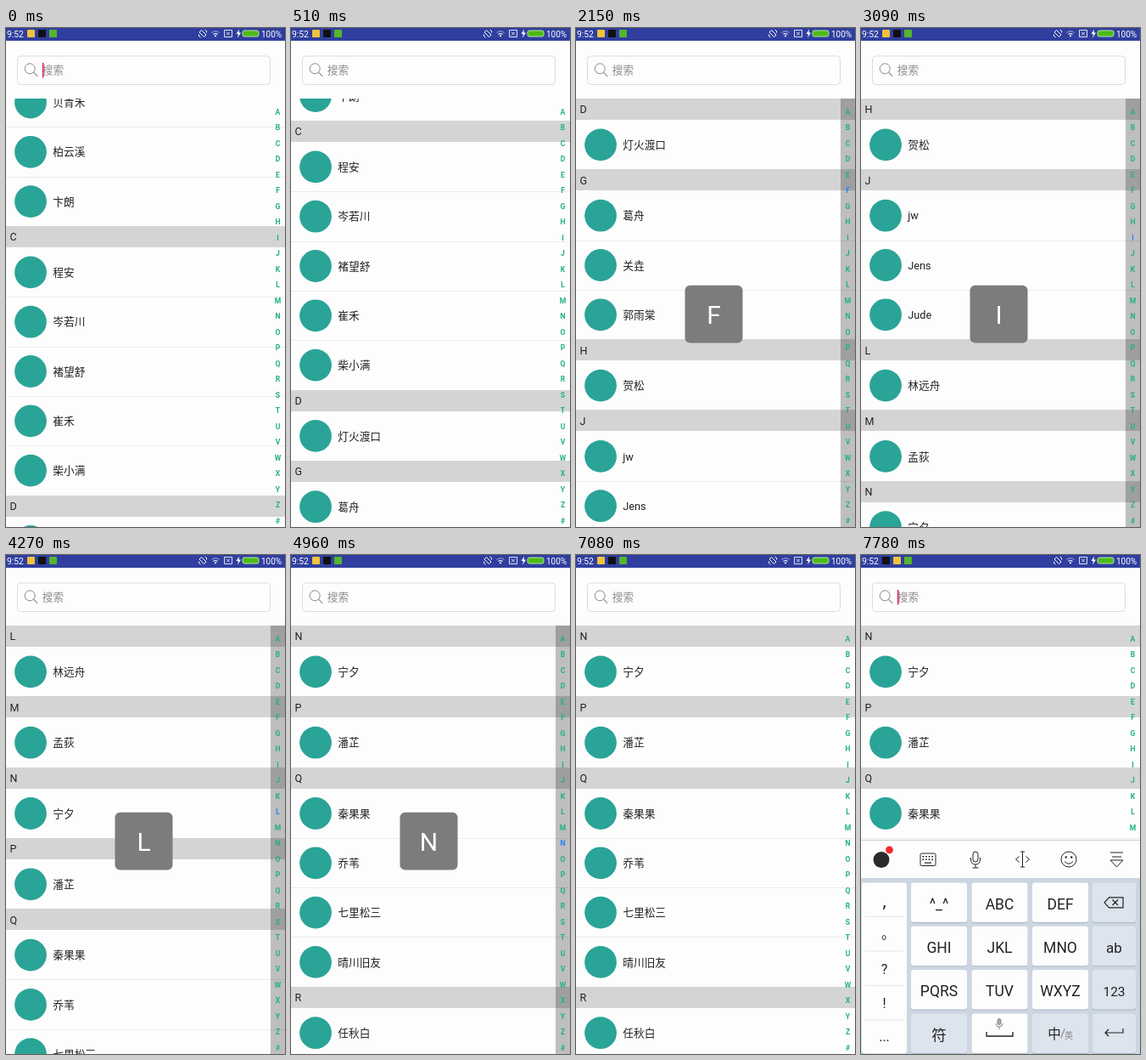
Write an HTML page with a canvas that moves like this. It is 329x587 px and loops after 8000 ms.

```html
<!DOCTYPE html>
<html lang="zh">
<head>
<meta charset="utf-8">
<style>
html, body { margin: 0; width: 100%; height: 100%; overflow: hidden; background: #fdfdfd; }
canvas { display: block; width: 329px; height: 587px; }
</style>
</head>
<body>
<canvas id="stage"></canvas>
<script>
const W = 329, H = 587, LOOP = 8000;
const TOP = 83, HEAD = 25, ROW = 58.3;
const INK = '#222', WHITE = '#fdfdfd';
const sections = {
  B: ['贝青禾', '柏云溪', '卞朗'],
  C: ['程安', '岑若川', '褚望舒', '崔禾', '柴小满'],
  D: ['灯火渡口'],
  G: ['葛舟', '关垚', '郭雨棠'],
  H: ['贺松'],
  J: ['jw', 'Jens', 'Jude'],
  L: ['林远舟'],
  M: ['孟荻'],
  N: ['宁夕'],
  P: ['潘芷'],
  Q: ['秦果果', '乔苇', '七里松三', '晴川旧友'],
  R: ['任秋白']
};
const letters = [...'ABCDEFGHIJKLMNOPQRSTUVWXYZ#'];

// Vertical place of every section inside the list
const place = {};
let total = 0;
for (const key in sections) {
  place[key] = total;
  total += HEAD + sections[key].length * ROW;
}

// Timeline (ms)
const dragStart = place.C - 233, dragMid = place.C - 109;
const scrollKeys = [[0, dragStart], [510, dragMid], [1110, dragMid + 105], [1230, dragMid + 115], [1620, dragMid + 240]];
const ticks = [0, 120, 250, 380, 510, 660, 810, 960, 1110, 1230, 1360, 1490, 1620,
  7080, 7230, 7350, 7480, 7620, 7780];
const touches = [[1900, 'D'], [2030, 'E'], [2150, 'F'], [2300, 'G'], [2450, 'H'], [2690, 'I'],
  [3490, 'J'], [3700, 'K'], [4000, 'L'], [4420, 'M'], [4820, 'N']];
const RELEASE = 6360;
const caretToggles = [120, 660, 1110, 1620, 2030, 2600, 3090, 3490, 4130, 4540, 4960, 5490, 6080, 6520, 7080, 7620];

const canvas = document.getElementById('stage');
const dpr = window.devicePixelRatio || 1;
canvas.width = W * dpr;
canvas.height = H * dpr;
const c = canvas.getContext('2d');

const snap = t => ticks.filter(v => v <= t).pop();

function rect(x, y, w, h, color, r = 0, border) {
  c.beginPath();
  c.roundRect(x, y, w, h, r);
  if (color) { c.fillStyle = color; c.fill(); }
  if (border) { c.strokeStyle = border; c.lineWidth = 1; c.stroke(); }
}
function disc(x, y, r, color) {
  c.beginPath();
  c.arc(x, y, r, 0, 7);
  c.fillStyle = color;
  c.fill();
}
function line(d, color, width = 1) {
  c.strokeStyle = color;
  c.lineWidth = width;
  c.stroke(new Path2D(d));
}
function shape(d, color) {
  c.fillStyle = color;
  c.fill(new Path2D(d));
}
// y is the middle of the capitals
function text(s, x, y, size, color = INK, align = 'left', weight = 400) {
  c.font = `${weight} ${size}px Roboto, "Noto Sans CJK SC", sans-serif`;
  c.textAlign = align;
  c.fillStyle = color;
  c.fillText(s, x, y + size * 0.365);
}

function scrollAt(t) {
  const now = snap(t);
  for (let i = 1; i < scrollKeys.length; i++) {
    const [t0, a] = scrollKeys[i - 1], [t1, b] = scrollKeys[i];
    if (now <= t1) return a + (b - a) * (now - t0) / (t1 - t0);
  }
  return scrollKeys[scrollKeys.length - 1][1];
}

function drawStatus(t) {
  rect(0, 0, W, 15, '#303f9f');
  text('9:52', 1, 7, 10.3, '#fff');
  const swapped = t >= 7620;
  rect(25, 2, 9, 9, swapped ? '#111' : '#f0c33c', 1);
  rect(38, 2, 9, 9, swapped ? '#f0c33c' : '#111', 1);
  rect(51, 2, 9, 9, '#55b52c', 1);
  // vibration, wifi, no SIM, charging
  line('M230.500 2.500 L236 8 L233.500 10.500 L228 5 Z M227.500 7.500 v2 l2 1.500 M234.500 2 l2 1.500 v2', '#fff');
  line('M242.500 5.500 Q247 2 251.500 5.500', '#aab1dc');
  line('M244.500 7.500 Q247 5.500 249.500 7.500', '#fff', 1.2);
  disc(247, 9.3, 1.1, '#fff');
  line('M257.500 2.500 h9 v8 h-9 z M260 4.500 l4 4 M264 4.500 l-4 4', '#dfe2f2');
  shape('M275 1.500 L271.500 7 H274 L273 11.500 L277 5.500 H274.500 Z', '#fff');
  rect(279, 3, 19, 7, '#4cbb17', 2, '#b9dfb0');
  text('100%', 301, 7, 10, '#fff');
}

function drawSearch(caret) {
  rect(13.5, 33, 298, 33.5, null, 4, '#dcdcdc');
  c.beginPath();
  c.arc(28.2, 47.8, 6, 0, 7);
  c.strokeStyle = '#8a8a8a';
  c.stroke();
  line('M32.500 52.100 L37.200 56.800', '#8a8a8a', 1.1);
  text('搜索', 42.8, 49, 12.6, '#8c8c8c');
  if (caret) rect(42.8, 41, 1.7, 17.5, '#e0266b');
}

function drawList(scroll) {
  c.save();
  c.beginPath();
  c.rect(0, TOP, W, H - TOP);
  c.clip();
  for (const key in sections) {
    let y = place[key] - scroll;
    rect(0, Math.round(y), W, HEAD, '#d4d4d4');
    text(key, 4.5, y + 12.8, 12.5);
    y += HEAD;
    sections[key].forEach((name, i) => {
      if (i) rect(0, Math.round(y), W, 1, '#ebebeb');
      disc(29, y + 29.4, 18.9, '#2aa497');
      text(name, 55.3, y + 29.4, 12.7);
      y += ROW;
    });
  }
  c.restore();
}

function drawIndex(active) {
  if (active) rect(312, TOP, 17, H - TOP, 'rgba(0,0,0,.25)');
  letters.forEach((s, i) => text(s, 320.5, 98.8 + i * 18.5, 8.6, s === active ? '#2c82ff' : '#23b086', 'center', 700));
  if (active) {
    rect(128.5, 302.8, 68, 67.7, '#7c7c7c', 6);
    text(active, 162.5, 337.5, 30, '#fff', 'center');
  }
}

function key(x, y, w, h, label, white, size = 17.5) {
  rect(x, y + 1, w, h, '#aab6c4', 3);
  rect(x, y, w, h, white ? '#fdfdfd' : '#dde4ed', 3);
  if (label) text(label, x + w / 2, y + h / 2 + 1.5, size, INK, 'center');
}

function drawToolbar() {
  rect(0, 335, W, 45, WHITE);
  rect(0, 335, W, 1, '#cfcfcf');
  disc(24, 358.5, 9.5, '#2b2b2b');
  disc(33.5, 346.8, 4.4, '#f5282d');
  rect(70, 351, 18, 14.5, null, 1.5, INK);
  for (let i = 0; i < 8; i++) rect(72.5 + i % 4 * 3.6, 354 + (i >> 2) * 3.4, 1.7, 1.6, INK);
  rect(75, 361.5, 8, 1.2, INK);
  rect(132, 349, 6, 12, null, 3, INK);
  line('M129.500 356 v2 q0 6 5.500 6 t5.500 -6 v-2 M135 364 v4 M131.500 368 h7', INK);
  line('M190.500 349 v18 M188 349 h5 M188 367 h5 M186.500 354.500 l-4 3.500 l4 3.500 M194.500 354.500 l4 3.500 l-4 3.500', INK);
  c.beginPath();
  c.arc(245, 358, 9, 0, 7);
  c.stroke();
  disc(241.8, 355.5, 1.2, INK);
  disc(248.2, 355.5, 1.2, INK);
  line('M240 360.500 q5 5.500 10 0', INK);
  line('M294 350 h15 M296 355 h11 M294 359 h15 l-7.500 8 z', INK);
}

function drawKeys() {
  rect(0, 380, W, 225, '#ccd6e0');
  key(1, 385.5, 53, 201, '', true);
  for (let i = 0; i < 4; i++) rect(5, 425 + i * 40.5, 45, 1, '#e6e6e6');
  text(',', 27.5, 406, 21, INK, 'center');
  text('。', 32, 445, 16, INK, 'center');
  text('?', 27.5, 487, 16, INK, 'center');
  text('!', 27.5, 527, 16, INK, 'center');
  text('...', 27.5, 566, 16, INK, 'center');
  const rows = [['^_^', 'ABC', 'DEF'], ['GHI', 'JKL', 'MNO'], ['PQRS', 'TUV', 'WXYZ'], ['符', '', '']];
  rows.forEach((row, r) => {
    const y = 385.5 + r * 51.3;
    row.forEach((label, i) => key(59 + i * 71.5, y, 66, 46.5, label, r < 3 || i === 1));
    key(273, y, 51, 46.5, ['', 'ab', '123', ''][r], false, r === 1 ? 17 : 15.5);
  });
  line('M287 408.800 l5.500 -6 h16.500 v12 h-16.500 z M296.500 405.500 l6.500 6.500 M303 405.500 l-6.500 6.500', INK, 1.2);
  line('M309 557 v5 h-21 M292 558 l-4 4 l4 4', INK, 1.2);
  line('M148 561 v5 h31 v-5', INK, 1.3);
  rect(161, 545.5, 4, 7, '#aaa', 2, '#888');
  line('M159 551 q0 4 4 4 t4 -4 M163 555 v3', '#888');
  text('中', 228, 563, 15.5, INK, 'center');
  text('/', 238, 563, 15, '#888', 'center');
  text('英', 245, 565, 10, '#888', 'center');
}

function draw(t) {
  c.setTransform(dpr, 0, 0, dpr, 0, 0);
  rect(0, 0, W, H, WHITE);

  const touch = touches.filter(v => v[0] <= t).pop();
  let scroll = scrollAt(t);
  if (touch) scroll = place[Object.keys(sections).filter(k => k <= touch[1]).pop()] - TOP;
  drawList(scroll);
  drawIndex(touch && t < RELEASE ? touch[1] : null);
  drawSearch(caretToggles.filter(v => v <= t).length % 2 === 0);
  drawStatus(t);

  const up = Math.min(1, Math.max(0, (snap(t) - 7230) / 390));
  if (up > 0) {
    c.translate(0, 252 * (1 - up) ** 2);
    drawToolbar();
    drawKeys();
  }
}

const start = performance.now();
function loop() {
  draw((performance.now() - start) % LOOP);
  requestAnimationFrame(loop);
}
loop();
</script>
</body>
</html>
```
